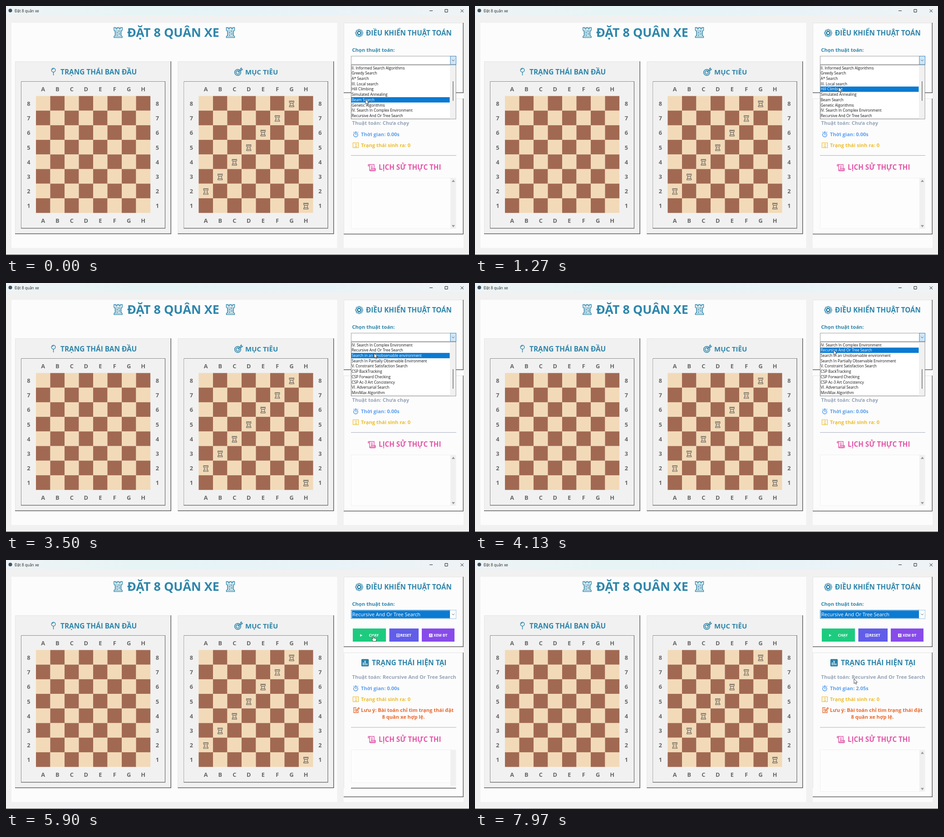
These frames come from a looping animation (1020x549 px, 8 s). An HTML page:

```html
<!DOCTYPE html>
<html lang="vi">
<head>
<meta charset="utf-8">
<title>Đặt 8 quân xe</title>
<style>
html, body { margin: 0; width: 100%; height: 100%; overflow: hidden; background: #f1f1f1; }
svg { display: block; width: 1020px; height: 549px; font-family: "Open Sans", "Noto Sans", sans-serif; }
text { white-space: pre; }
</style>
</head>
<body>
<svg id="stage" viewBox="0 0 1020 549">
  <defs>
    <linearGradient id="bar">
      <stop offset="0" stop-color="#eef3f4"/><stop offset=".3" stop-color="#e6f4f6"/>
      <stop offset=".7" stop-color="#e8f3f8"/><stop offset="1" stop-color="#eff3f5"/>
    </linearGradient>
    <g id="rook" fill="none" stroke-linejoin="round">
      <path d="M-5-6.5h2.2v1.7h1.7v-1.7h2.2v1.7h1.7v-1.7H5v3.3L3-1.5l.7 5L5 4.7v1.8H-5V4.7l1.3-1.2.7-5L-5-3.2z"/>
      <path d="M-3-1.5h6M-3.7 3.5h7.4"/>
    </g>
    <g id="tower" fill="none" stroke="#2e86ab" stroke-width="1.5">
      <path d="M-9-11h4v3h3v-3h4v3h3v-3h4v6L6.5-2.5v9L9 8.5V11H-9V8.5l2.500-2v-9L-9-5z"/>
      <path d="M-7-4.500H7M-6-1.500H6M-6 1.500H6M-6 4.500H6M-7 8H7M-2-1.500v3M3 1.500v3M-2 4.500v3M2-4.500v3" stroke-width="1"/>
    </g>
  </defs>
  <g id="scene"></g>
  <g id="status">
    <g id="lower">
      <path id="divider" d="M760 329.500H992" stroke="#a9adc2"/>
      <g fill="none" stroke="#e356a8" stroke-width="1.4">
        <path d="M798 349.500h13v9M801 349.500v12M798 349.500v3h3M804 353h4M804 356h4M804 359h3M801 361.500h11v-3h-8M812 358.500h2v3a2 2 0 0 1-2 2h-9a2 2 0 0 1-2-2"/>
      </g>
    </g>
    <rect id="history" x="760.5" width="219" fill="#fdfdfd" stroke="#f0f0f0"/>
    <rect id="track" x="979" width="12.500" fill="#f0f0f0"/>
    <path id="arrowUp" d="M982 388h7l-3.500-5z" fill="#9b9b9b"/>
    <path id="arrowDown" d="M982 0h7l-3.500 5z" fill="#9b9b9b"/>
    <path id="ghostEdge" d="M760 503H991.500" stroke="#555" stroke-width="1.500"/>
    <g id="note">
      <path d="M776 332v4.500h-10v-11h6M768 329h4M768 332h2M771 334l1-3 5-5.500 1.600 1.500-5 5.500z" fill="none" stroke="#e8672c" stroke-width="1.3"/>
    </g>
  </g>
  <g id="combo"></g>
  <g id="popup"></g>
  <path id="arrow" d="M0 0v10.500l2.400-2.200 1.700 3.700 1.700-.8-1.700-3.600H7.500z" fill="#fff" stroke="#222" stroke-width=".8"/>
  <path id="hand" d="M-1 1c0-1.400 2-1.400 2 0v4l5 1.200c1 .3 1.200 1 1 2L6 12.500H.5L-3.500 8c-.7-1 .5-2 1.400-1.200L-1 8z" fill="#fff" stroke="#222" stroke-width=".8"/>
</svg>
<script>
const $ = id => document.getElementById(id);
const NS = "http://www.w3.org/2000/svg";
const TEAL = "#2e86ab", LOOP = 8000;

function add(parent, tag, attrs, content) {
  const node = document.createElementNS(NS, tag);
  for (const key in attrs) node.setAttribute(key, attrs[key]);
  if (content !== undefined) node.textContent = content;
  return parent.appendChild(node);
}
const rect = (g, x, y, width, height, fill, extra) => add(g, "rect", { x, y, width, height, fill, ...extra });
const line = (g, d, stroke, width = 1, extra) => add(g, "path", { d, stroke, "stroke-width": width, fill: "none", ...extra });
const label = (g, x, middle, size, fill, content, weight = 700, anchor = "start") =>
  add(g, "text", { x, y: middle + size * 0.36, "font-size": size, fill, "font-weight": weight, "text-anchor": anchor }, content);
const show = (node, on) => node.setAttribute("visibility", on ? "visible" : "hidden");

// Raised panel: pale top and left, dark right and bottom.
function raised(g, x, y, w, h, fill) {
  rect(g, x, y, w, h, fill);
  line(g, `M${x + .5} ${y + h}V${y + .5}H${x + w}`, "#e4e4e4");
  return line(g, `M${x} ${y + h - .7}H${x + w - .7}V${y}`, "#606060", 1.5);
}

function board(g, dx, rooks) {
  const left = 66 + dx, top = 198.500, cw = 31.500, ch = 32.200, gray = "#676767";
  raised(g, 20 + dx, 122, 344, 381, "#f1f1f1");
  line(g, `M${33.5 + dx} 490V166.500H${351 + dx}`, "#858585");
  line(g, `M${34.5 + dx} 489V167.500H${349 + dx}V489Z`, "#fbfbfb");
  line(g, `M${33 + dx} 490H${350.5 + dx}V166`, "#707070", 1.3);
  for (let i = 0; i < 8; i++) {
    const cx = left + (i + .5) * cw, cy = top + (i + .5) * ch;
    for (let j = 0; j < 8; j++)
      rect(g, left + j * cw, top + i * ch, cw + .1, ch + .1, (i + j) % 2 ? "#a26952" : "#f2dab8");
    for (const y of [183.500, 473]) label(g, cx, y, 12.800, gray, "ABCDEFGH"[i], 700, "middle");
    for (const x of [50, 333.500]) label(g, x + dx, cy + .8, 12.800, gray, 8 - i, 700, "middle");
  }
  if (rooks) for (let row = 0; row < 8; row++) {
    const col = (14 - row) % 8 === 7 ? 7 : row === 7 ? 7 : 6 - row;
    add(g, "use", { href: "#rook", x: left + (col + .5) * cw, y: top + (row + .5) * ch + 1.2, stroke: "#6b6660", "stroke-width": 1.2 });
  }
}

// Window, boards and static headings
const scene = $("scene");
rect(scene, 0, 0, 1020, 549, "#f1f1f1");
rect(scene, 0, 0, 1020, 21, "url(#bar)");
add(scene, "circle", { cx: 9.500, cy: 10, r: 4, fill: "#3c5368" });
label(scene, 19, 10.500, 8.350, "#222", "Đặt 8 quân xe", 400);
line(scene, "M933 10.500h7M967 7.500h6v6h-6zM1001.500 7.500l6.500 6.500M1008 7.500l-6.500 6.500", "#222");
line(scene, "M0 548.500H1020", "#4a4a4a");
rect(scene, 12, 37, 717.500, 496.500, "#fcfcfc");
rect(scene, 744, 37, 264, 496.500, "#fcfcfc");
add(scene, "use", { href: "#tower", x: 247, y: 58.500 });
add(scene, "use", { href: "#tower", x: 494.500, y: 58.500 });
label(scene, 267, 58.500, 26.900, TEAL, "ĐẶT 8 QUÂN XE");

board(scene, 0, false);
board(scene, 358.500, true);
add(scene, "circle", { cx: 104.500, cy: 141.500, r: 4.300, fill: "none", stroke: TEAL, "stroke-width": 1.4 });
line(scene, "M104.500 146v7M102 140.500a3 3 0 0 1 2.500-2", TEAL, 1.4);
label(scene, 120, 145.500, 15.400, TEAL, "TRẠNG THÁI BAN ĐẦU");
for (const r of [6.700, 3.700]) add(scene, "circle", { cx: 510.500, cy: 146.500, r, fill: "none", stroke: TEAL, "stroke-width": 1.7 });
line(scene, "M510.500 146.500l6-6v-2.500l2-1.500v3h2.500l-2 2.500h-3", TEAL, 1.4);
label(scene, 527, 145.500, 15, TEAL, "MỤC TIÊU");

// Control card
raised(scene, 744, 37, 264, 155, "#fcfcfc");
for (let i = 0; i < 8; i++) {
  const a = i * Math.PI / 4;
  add(scene, "circle", { cx: 778 + 6 * Math.cos(a), cy: 59.500 + 6 * Math.sin(a), r: 2.200, fill: "none", stroke: TEAL, "stroke-width": 1.3 });
}
add(scene, "circle", { cx: 778, cy: 59.500, r: 3, fill: "none", stroke: TEAL, "stroke-width": 1.3 });
label(scene, 793, 59.500, 15.200, TEAL, "ĐIỀU KHIỂN THUẬT TOÁN");
label(scene, 762.500, 97, 11.100, TEAL, "Chọn thuật toán:");
rect(scene, 764, 151, 73, 29, "#1dcb7f");
rect(scene, 844.500, 151, 64.500, 29, "#615de8");
rect(scene, 916, 151, 72, 29, "#874bea");
add(scene, "path", { d: "M780 163.500l5.500 2.700-5.500 2.700z", fill: "#fff" });
label(scene, 799.500, 166, 8.100, "#fff", "CHẠY");
line(scene, "M860.500 163h6.500v6.500h-6.500zM862 165.500h4M862 167.500h4", "#fff");
label(scene, 868.500, 166, 8.400, "#fff", "RESET");
rect(scene, 932, 162.500, 7.500, 7.500, "#fff");
line(scene, "M934 164.500h3.500M934 168.500v-1.500h3.500v1.500", "#874bea");
label(scene, 942, 166, 8.200, "#fff", "XEM ĐT");

// Status card
const card = add(scene, "g", {});
rect(card, 744, 204, 264, 299, "#fcfcfc");
line(card, "M744.500 503V204.500H1008", "#e4e4e4");
const cardEdge = line(card, "", "#606060", 1.5);
rect(card, 783, 218.500, 16, 16, TEAL, { rx: 1.5 });
line(card, "M787 232v-6M791 232v-10M795 232v-4", "#d8eef5", 2);
line(card, "M784 219.500h14v14h-14z", "#236b8c");
label(card, 806, 226.500, 15.500, TEAL, "TRẠNG THÁI HIỆN TẠI");
const algorithm = label(card, 762.500, 258.500, 11.100, "#94a3b8", "");
const BLUE = "#5c9fee", GOLD = "#ecbd2e";
add(card, "circle", { cx: 770.500, cy: 284, r: 4.600, fill: "none", stroke: BLUE, "stroke-width": 1.6 });
line(card, "M770.500 284v-3M770.500 284h2M768.500 277.500h4M774.500 279l1.200-1.200M766.500 279l-1.200-1.200", BLUE, 1.4);
const timer = label(card, 782, 283, 11.100, BLUE, "");
line(card, "M764.500 301.500h12v11h-12z", GOLD, 1.2);
label(card, 770.500, 304.800, 5, GOLD, "12", 700, "middle");
label(card, 770.500, 309.800, 5, GOLD, "34", 700, "middle");
label(card, 782, 307.200, 11.100, GOLD, "Trạng thái sinh ra: 0");
label($("note"), 782, 331, 11.100, "#e8672c", "Lưu ý: Bài toán chỉ tìm trạng thái đặt");
label($("note"), 875.500, 346.500, 11.100, "#e8672c", "8 quân xe hợp lệ.", 700, "middle");
label($("lower"), 821, 356, 15.200, "#e356a8", "LỊCH SỬ THỰC THI");

// Combo box
const combo = $("combo");
const field = rect(combo, 760.500, 110.500, 231, 18.500, "#fff");
const chosen = add(combo, "g", {});
rect(chosen, 762, 111.500, 216, 16.500, "#0b7ad1");
label(chosen, 763, 120, 10.950, "#fff", "Recursive And Or Tree Search", 400);
const drop = rect(combo, 979, 110.500, 12.500, 18.500, "#cfe6f7", { stroke: "#3f86bd" });
line(combo, "M982.500 118.500l2.700 2.700 2.700-2.700", "#555");

// Drop-down list
const ITEMS = ["II. Informed Search Algorithms", "Greedy Search", "A* Search", "III. Local search", "Hill Climbing",
  "Simulated Annealing", "Beam Search", "Genetic Algorithms", "IV. Search In Complex Environment",
  "Recursive And Or Tree Search", "Search in an Unobservable environment", "Search In Partially Observable Environment",
  "V. Constraint Satisfaction Search", "CSP BackTracking", "CSP Forward Checking", "CSP Ac-3 Art Concistency",
  "VI. Adversarial Search", "MiniMax Algorithm"];
const ROW = 11.720, LIST_TOP = 130.700;
const popup = $("popup");
rect(popup, 760.500, 130, 230.500, 119, "#fff", { stroke: "#777" });
rect(popup, 978, 130.500, 12.500, 118, "#f1f1f1");
const thumb = rect(popup, 984, 166, 1.800, 43, "#858585");
const hover = rect(popup, 761, 0, 216.500, ROW, "#0b7ad1");
const rows = Array.from({ length: 10 }, (_, i) => label(popup, 761.500, LIST_TOP + (i + .5) * ROW, 8.250, "#111", "", 400));

// Pointer stops: time, x, y
const STOPS = [[0, 792, 206], [250, 792, 206], [1000, 801, 179], [1400, 801, 179], [2300, 825, 214], [2900, 825, 214],
  [3350, 811, 155], [3600, 811, 155], [4050, 790, 148], [4900, 790, 148], [5500, 809, 167], [6150, 809, 167],
  [7000, 835, 262], [LOOP, 835, 262]];
const CLOSE = 4300, RUN = 5890, SETTLED = 5930, TIMER_START = 5920, TICK = 102.500;

function pointerAt(t) {
  const i = STOPS.findIndex(stop => stop[0] > t);
  const [t0, x0, y0] = STOPS[i - 1], [t1, x1, y1] = STOPS[i];
  const u = (t - t0) / (t1 - t0), k = u * u * (3 - 2 * u);
  return [x0 + (x1 - x0) * k, y0 + (y1 - y0) * k];
}

function drawList(t, y) {
  const first = t < 2880 ? 0 : t < 3000 ? 4 : 8;
  const active = Math.max(0, Math.min(9, Math.floor((y - LIST_TOP) / ROW)));
  thumb.setAttribute("y", 166 + first * 3);
  hover.setAttribute("y", LIST_TOP + active * ROW);
  rows.forEach((row, i) => {
    row.textContent = ITEMS[first + i];
    row.setAttribute("fill", i === active ? "#fff" : "#111");
  });
}

function drawStatus(t) {
  const running = t >= RUN, settling = running && t < SETTLED;
  const top = running ? 418.500 : 379, bottom = settling ? 491 : running ? 510.500 : 491;
  const edge = running ? 522.500 : 503;
  card.firstChild.setAttribute("height", edge - 204);
  cardEdge.setAttribute("d", `M744 ${edge - .2}H1007.300V204`);
  algorithm.textContent = "Thuật toán: " + (running ? "Recursive And Or Tree Search" : "Chưa chạy");
  const seconds = Math.max(0, Math.floor((t - TIMER_START) / TICK)) * TICK / 1000;
  timer.textContent = `Thời gian: ${seconds.toFixed(2)}s`;
  show($("note"), running);
  show($("ghostEdge"), settling);
  show($("arrowUp"), !settling);
  show($("arrowDown"), !settling);
  $("lower").setAttribute("transform", `translate(0 ${running ? 39.500 : 0})`);
  $("divider").setAttribute("stroke", running ? "#b0b0b0" : "#a9adc2");
  $("history").setAttribute("y", top);
  $("history").setAttribute("height", bottom - top);
  $("track").setAttribute("y", top);
  $("track").setAttribute("height", (settling ? 498 : bottom) - top);
  $("arrowUp").setAttribute("transform", `translate(0 ${top - 379})`);
  $("arrowDown").setAttribute("transform", `translate(0 ${bottom - 8})`);
}

function frame(now) {
  const t = now % LOOP, open = t < CLOSE, [x, y] = pointerAt(t);
  show(popup, open);
  show(chosen, !open);
  drop.setAttribute("fill", open ? "#cfe6f7" : "#fff");
  drop.setAttribute("stroke", open ? "#3f86bd" : "none");
  field.setAttribute("stroke", open ? "#a0a0a0" : "#3a8cc8");
  if (open) drawList(t, y);
  drawStatus(t);
  const onButton = !open && x > 764 && x < 837 && y > 151 && y < 180;
  show($("arrow"), !onButton);
  show($("hand"), onButton);
  for (const id of ["arrow", "hand"]) $(id).setAttribute("transform", `translate(${x} ${y})`);
  requestAnimationFrame(frame);
}
frame(performance.now());
</script>
</body>
</html>
```
